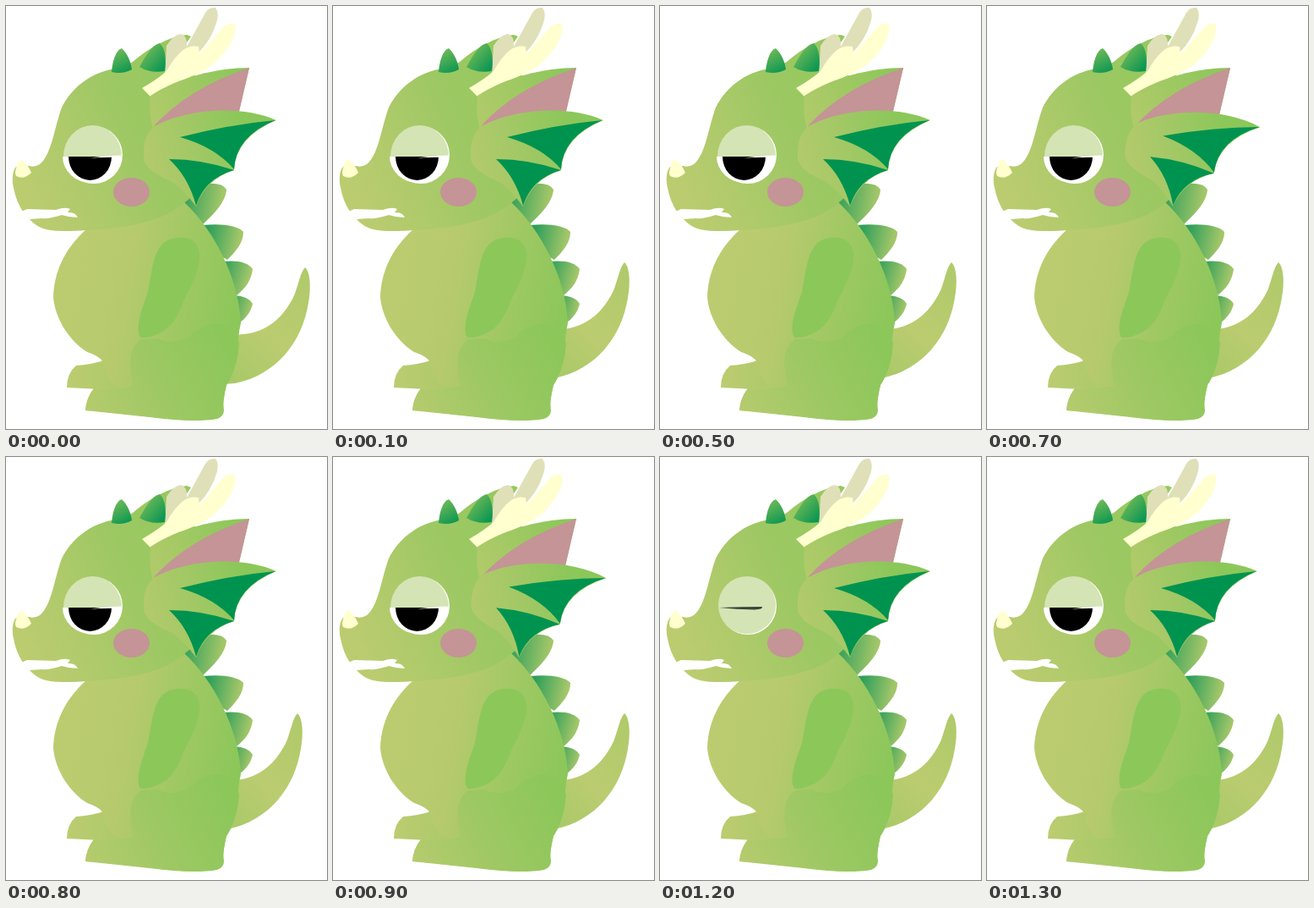
An HTML page with a canvas for the animation above (1400 ms loop, 380 by 500 pixels).

```html
<!DOCTYPE html>
<html lang="en">
<head>
<meta charset="utf-8">
<title>Sleepy little dragon</title>
<style>
html, body { margin: 0; width: 100%; height: 100%; overflow: hidden; background: #fff; }
canvas { display: block; width: 380px; height: 500px; }
</style>
</head>
<body>
<canvas id="stage"></canvas>
<script>
const W = 380, H = 500, LOOP = 1400;
const canvas = document.getElementById('stage');
const ctx = canvas.getContext('2d');
const scale = window.devicePixelRatio || 1;
canvas.width = W * scale;
canvas.height = H * scale;

const YELLOW = '#bbcc70', GREEN = '#8cc75a', DARK = '#0b9652', IVORY = '#ffffd0';

function grad(x0, y0, x1, y1, ...colors) {
  const g = ctx.createLinearGradient(x0, y0, x1, y1);
  colors.forEach((c, i) => g.addColorStop(i / (colors.length - 1), c));
  return g;
}

function shape(d, paint) {
  const path = new Path2D(d);
  return () => { ctx.fillStyle = paint; ctx.fill(path); };
}

function disc(x, y, rx, ry, color, from = 0, to = Math.PI * 2) {
  ctx.fillStyle = color;
  ctx.beginPath();
  ctx.ellipse(x, y, rx, ry, 0, from, to);
  ctx.fill();
}

const tail = shape(
  'M345 303C352 309 352 330 349 345C342 390 312 430 262 440L235 442L240 390' +
  'Q258 384 270 382C302 380 322 359 333 334C338 320 340 308 345 303Z',
  grad(255, 430, 350, 330, '#a9c968', YELLOW, '#b1ca6b'));

const spikes = [
  shape('M236 210Q256 208 261 217C260 232 246 246 232 259L209 231Z',
    grad(215, 228, 255, 235, '#3da45c', '#a3c669')),
  shape('M233 259Q270 256 281 267C281 280 272 290 262 300L248 292Z',
    grad(238, 270, 276, 278, '#2d9f5a', '#a3c669')),
  shape('M256 302Q284 299 292 311C290 325 284 333 273 342L262 325Z',
    grad(260, 312, 288, 320, '#3da45c', '#a3c669')),
  shape('M270 342Q287 343 292 352C290 361 285 368 276 375L268 365Z',
    grad(270, 352, 290, 358, '#4ba85d', '#a3c669'))
];

const body = [
  shape('M83 425Q100 424 116 419L160 425L150 454L112 453L72 451Q72 434 83 425Z',
    grad(75, 440, 150, 440, YELLOW, '#a9c968')),
  shape('M95 264C68 288 57 316 56 344C58 369 74 395 96 409Q106 412 113 418' +
    'Q119 439 126 446Q132 452 143 452Q120 455 104 452Q95 464 94 478' +
    'C130 480 175 487 219 490L250 486Q258 480 257 469' +
    'Q258 460 261 448Q271 433 275 410Q274 390 278 375C276 322 246 264 210 231L150 240Z',
    grad(75, 340, 270, 375, YELLOW, '#b6ca6d', '#9fc863', GREEN)),
  shape('M180 393Q196 402 217 391C240 365 273 374 276 400Q271 434 261 448' +
    'Q256 468 258 478Q258 485 250 488Q222 493 170 486L94 478Q95 463 104 452Q126 455 151 449' +
    'C145 425 145 404 160 394Z',
    grad(95, 475, 260, 395, '#b5cb6d', '#9dc863', GREEN)),
  shape('M191 277C206 270 226 273 229 291C231 309 219 332 210 349C204 366 197 378 185 385' +
    'Q171 393 159 392C152 379 162 356 168 338C173 314 174 286 191 277Z', GREEN)
];

const head = shape(
  'M12 190C7 195 7 207 9 215Q12 231 20 243L28 252C36 261 46 266 66 266' +
  'C92 266 110 264 130 262C162 258 192 250 212 232L226 220L230 84L200 76L212 46L219 36L214 34' +
  'C193 36 170 49 150 66Q138 74 124 75C100 80 78 96 66 120C57 144 54 176 40 187Q34 191 27 189Z',
  grad(20, 215, 215, 130, YELLOW, '#aeca6a', '#9dc863', '#97c85f'));

const nose = shape('M12 192Q13 184 18 181Q26 187 30 197Q21 206 12 201Q10 197 12 192Z', IVORY);
const mouth = shape(
  'M18 243L25 240L59 241Q70 237 76 240L73 244Q82 243 85 250Q75 250 66 247' +
  'Q51 252 42 251L28 252Z', '#fff');

const headSpikes = [
  shape('M125 78C126 65 130 52 137 50C143 55 148 66 149 75Q138 81 125 78Z',
    grad(143, 79, 131, 55, DARK, '#65b657')),
  shape('M158 72C165 60 172 46 182 44C189 50 190 65 188 77Q171 80 158 72Z',
    grad(187, 73, 166, 54, DARK, '#65b657'))
];

const horns = [
  shape('M188 80L190 47Q198 34 207 33Q215 35 214 48L236 8Q240 1 248 2Q253 9 249 20' +
    'Q243 40 228 55L200 82Z', '#dfe0b8'),
  shape('M161 97Q180 86 190 77Q200 59 211 51Q219 46 228 48L229 57L258 24Q264 19 271 21' +
    'Q273 32 266 44C257 60 245 71 229 79Q199 92 172 108Z', IVORY)
];

const upperEar = [
  shape('M171 106C205 84 250 73 288 73L275 128L176 152Q168 130 171 106Z',
    grad(172, 125, 275, 75, '#b0ca6a', GREEN)),
  shape('M175 142Q216 97 288 73L275 129Q225 136 175 142Z', '#c49496')
];

const lowerEar = [
  shape('M176 142C212 122 278 116 320 135Q272 155 270 194Q236 205 225 237' +
    'C214 222 205 213 195 207C175 198 162 190 163 176C163 160 166 150 176 142Z',
    grad(164, 180, 280, 150, '#b3ca6b', '#a1c865', GREEN)),
  shape('M206 155Q265 140 319 135Q272 154 270 193Q248 167 206 155Z', '#009350'),
  shape('M193 181Q232 181 270 194Q235 204 225 236Q216 202 193 181Z', '#009350')
];

const closedLash = shape('M70 178Q96 177 121 177Q122 180 112 180.5Q90 180 70 178Z', '#39463a');
const lidEdge = shape('M99 180Q112 177 137 176.5L136 178.5Q115 178.5 99 180Z', '#fff');

const run = list => list.forEach(draw => draw());

function eye(closed) {
  const lid = '#d4e4b4';
  disc(104, 176, 34, 34, '#fff');
  if (closed) {
    disc(103, 175, 34, 34, lid);
    closedLash();
  } else {
    disc(101, 178, 34, 31, '#fff', 0, Math.PI);
    disc(99.5, 178, 25.5, 28, '#000', 0, Math.PI);
    disc(102.5, 178, 34.5, 37, lid, Math.PI, Math.PI * 2);
    lidEdge();
  }
}

function paint(t) {
  const within = (a, b) => t >= a && t < b;
  const tailOut = within(0, 100);
  const blink = within(300, 500) || within(1200, 1300);
  const flick = within(700, 800) || within(900, 1000);

  ctx.setTransform(scale, 0, 0, scale, 0, 0);
  ctx.fillStyle = '#fff';
  ctx.fillRect(0, 0, W, H);

  ctx.save();
  if (tailOut) ctx.translate(9, 6);
  tail();
  ctx.restore();

  run(spikes);
  run(body);
  head();
  mouth();
  nose();
  run(horns);
  run(headSpikes);
  eye(blink);
  disc(148.5, 220, 21.5, 17, '#c49496');
  run(upperEar);

  ctx.save();
  if (flick) {
    ctx.translate(226, 180);
    ctx.rotate(0.085);
    ctx.translate(-226, -180);
  }
  run(lowerEar);
  ctx.restore();
}

const start = performance.now();
function tick(now) {
  paint(Math.max(0, now - start) % LOOP);
  requestAnimationFrame(tick);
}
paint(0);
requestAnimationFrame(tick);
</script>
</body>
</html>
```
